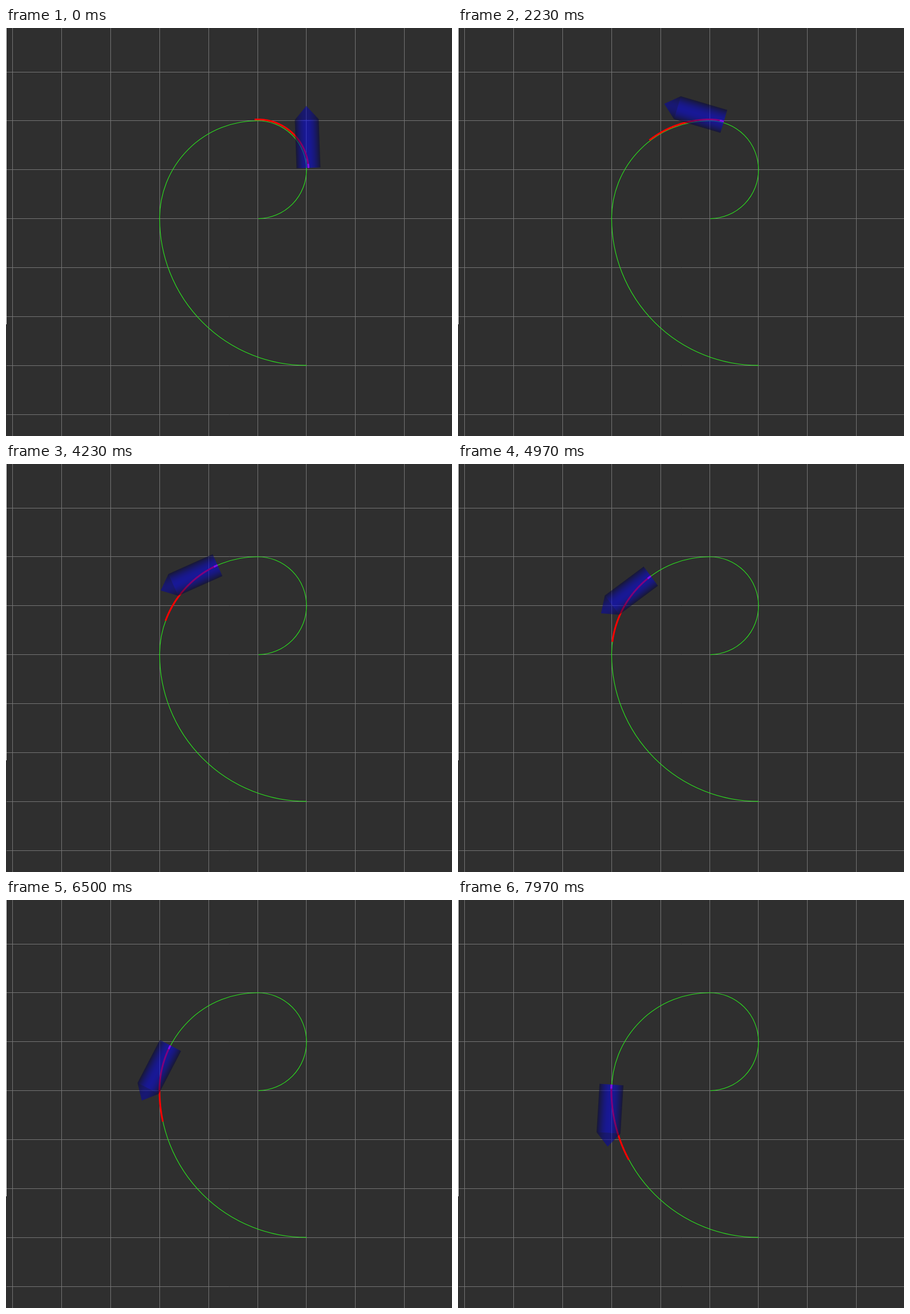
These frames come from a looping animation (782 px wide and 716 px high, 8000 ms). An HTML page with a canvas:

```html
<!DOCTYPE html>
<html lang="en">
<head>
<meta charset="utf-8">
<title>Path following</title>
<style>
  html, body { margin: 0; width: 100%; height: 100%; overflow: hidden; background: #2f2f2f; }
  canvas { display: block; width: 782px; height: 716px; }
</style>
</head>
<body>
<canvas id="stage" width="782" height="716"></canvas>
<script>
const ctx = document.getElementById('stage').getContext('2d');
const LOOP = 8000;
const FPS = 0.03;          // pictures per millisecond
const CELL = 85.85;
const HORIZON = 137;       // length of the planned stretch
const SHAFT = 85, HEAD = 24, HALF = 21;

// Three tangent arcs, angles in radians, counter-clockwise from the right.
const ARCS = [
  { x: 441, y: 248.7, r: 85.9, from: 0, to: Math.PI / 2 },
  { x: 441, y: 334.5, r: 171.7, from: Math.PI / 2, to: Math.PI },
  { x: 527, y: 334.5, r: 257.6, from: Math.PI, to: Math.PI * 1.5 }
];

// time, distance along the path, sideways error
const STEPS = [
  [0, 3, 3.5], [1130, 58.4, 3], [2230, 110, 2.5], [3530, 170.5, 0.3],
  [4970, 245.3, 0.2], [6500, 322.4, 0.3], [8000, 395.7, 0.5]
];

const mix = (a, b, k) => a + (b - a) * k;

function stateAt(t) {
  const i = Math.max(1, STEPS.findIndex(step => step[0] >= t));
  const a = STEPS[i - 1], b = STEPS[i];
  const k = (t - a[0]) / (b[0] - a[0]);
  return { dist: mix(a[1], b[1], k), error: mix(a[2], b[2], k) };
}

function pointAt(dist, error) {
  let arc;
  for (arc of ARCS) {
    const length = arc.r * (arc.to - arc.from);
    if (dist <= length) break;
    dist -= length;
  }
  const angle = arc.from + dist / arc.r;
  const r = arc.r + error;
  return { x: arc.x + r * Math.cos(angle), y: arc.y - r * Math.sin(angle), angle };
}

function stroke(color, width, trace) {
  ctx.strokeStyle = color;
  ctx.lineWidth = width;
  ctx.beginPath();
  trace();
  ctx.stroke();
}

function drawGrid() {
  stroke('#747474', 1, () => {
    for (let i = 0; i < 9; i++) {
      const x = Math.round(11.4 + i * CELL) + 0.5;
      ctx.moveTo(x, 0);
      ctx.lineTo(x, 716);
    }
    for (let i = 0; i < 8; i++) {
      const y = Math.round(76.6 + i * CELL) + 0.5;
      ctx.moveTo(1, y);
      ctx.lineTo(782, y);
    }
  });
  ctx.fillStyle = '#fff';
  ctx.fillRect(0, 0, 1, 520);
}

function drawPath() {
  stroke('#2ce61e', 1.1, () => {
    const first = ARCS[0];
    ctx.arc(first.x, first.y, first.r, Math.PI / 2 - 0.02, 0, true);
    for (const a of ARCS) ctx.arc(a.x, a.y, a.r, -a.from, -a.to, true);
  });
}

function drawPlan({ dist, error }, length, color, width) {
  stroke(color, width, () => {
    for (let d = 0; d <= length; d++) {
      const p = pointAt(dist + d, error * (1 - 0.35 * d / HORIZON));
      ctx.lineTo(p.x, p.y);
    }
  });
}

function roundShade(dark, bright) {
  const shade = ctx.createLinearGradient(0, -HALF, 0, HALF);
  for (let i = 0; i <= 8; i++) {
    const blue = Math.round(mix(dark, bright, Math.sin(Math.PI * i / 8)));
    shade.addColorStop(i / 8, `rgb(0,0,${blue})`);
  }
  return shade;
}

function drawArrow({ dist, error }) {
  const p = pointAt(dist, error);
  ctx.save();
  ctx.translate(p.x, p.y);
  ctx.rotate(-p.angle - Math.PI / 2);
  ctx.globalAlpha = 0.5;
  ctx.fillStyle = roundShade(60, 255);
  ctx.fillRect(0, -HALF, SHAFT, HALF * 2);
  ctx.fillStyle = roundShade(50, 185);
  ctx.beginPath();
  ctx.moveTo(SHAFT, -HALF);
  ctx.lineTo(SHAFT + HEAD, 0);
  ctx.lineTo(SHAFT, HALF);
  ctx.fill();
  ctx.restore();
}

function draw(now) {
  const frame = Math.floor((now % LOOP + 4) * FPS);
  const state = stateAt(Math.min(frame / FPS, LOOP));
  ctx.fillStyle = '#2f2f2f';
  ctx.fillRect(0, 0, 782, 716);
  drawGrid();
  drawPath();
  drawPlan(state, HORIZON, '#f00', 3);
  drawArrow(state);
  drawPlan(state, 7, '#8010f0', 3);
}

const start = performance.now();
function tick() {
  draw(performance.now() - start);
  requestAnimationFrame(tick);
}
tick();
</script>
</body>
</html>
```
